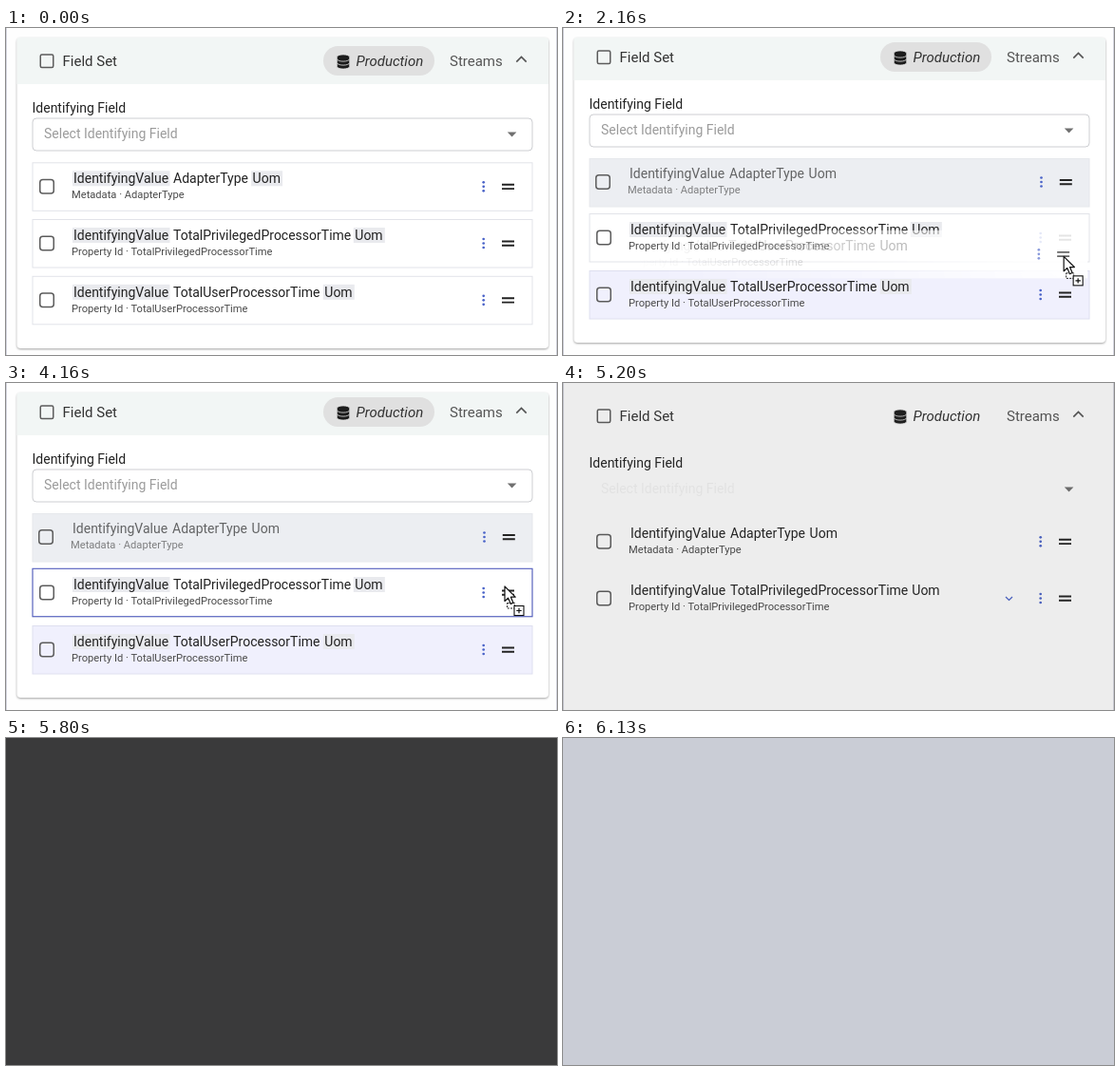
Recreate the animation shown at these times as an HTML page. Size 580x344 px, loop 6.16 s.

```html
<!DOCTYPE html>
<html lang="en">
<head>
<meta charset="utf-8">
<title>Field set</title>
<style>
html, body { margin: 0; width: 100%; height: 100%; overflow: hidden; background: #fdfdfd; }
svg { display: block; width: 580px; height: 344px; font-family: Roboto, "Open Sans", sans-serif; }
.flat .surf { display: none; }
.flat .hint { opacity: .12; }
.title { font-size: 14px; fill: #222; }
.sub { font-size: 11.15px; fill: #4a4a4a; }
.head { font-size: 15px; fill: #333; }
.mark { fill: #e9eaee; }
.line { fill: none; stroke-linecap: butt; }
</style>
</head>
<body>
<svg id="stage" viewBox="0 0 580 344"></svg>
<script>
(() => {
const LOOP = 6160;
const stage = document.getElementById('stage');

function el(parent, tag, attrs = {}, content) {
  const node = document.createElementNS(stage.namespaceURI, tag);
  set(node, attrs);
  if (content) node.textContent = content;
  parent.appendChild(node);
  return node;
}
function set(node, attrs) {
  for (const key in attrs) node.setAttribute(key, attrs[key]);
}
const rect = (p, x, y, width, height, attrs) => el(p, 'rect', { x, y, width, height, ...attrs });
const path = (p, d, attrs) => el(p, 'path', { d, ...attrs });
const text = (p, x, y, cls, str, attrs) => el(p, 'text', { x, y, class: cls, ...attrs }, str);
const move = (node, x, y) => node.setAttribute('transform', `translate(${x} ${y})`);
const show = (node, on) => node.setAttribute('visibility', on ? 'visible' : 'hidden');
const clamp = v => Math.max(0, Math.min(1, v));
const span = (t, a, b) => clamp((t - a) / (b - a));
const ease = v => v * v * (3 - 2 * v);
const lerp = (a, b, v) => a + (b - a) * v;
const mix = (a, b, v) => `rgb(${a.map((c, i) => Math.round(lerp(c, b[i], v)))})`;

function checkbox(p, x, y, size, r) {
  return rect(p, x - size / 2, y - size / 2, size, size,
    { rx: r, fill: 'none', stroke: '#5c5c5c', 'stroke-width': 1.5 });
}

// One draggable row, drawn from its own top edge
function makeRow(p, label, sub, uomX) {
  const g = el(p, 'g');
  const box = rect(g, 28, .5, 526, 50.5, { class: 'surf', fill: '#fff', stroke: '#e2e3e9' });
  const left = el(g, 'g');
  checkbox(left, 43, 25.5, 14.5, 3);
  const marks = el(left, 'g', { class: 'surf' });
  rect(marks, 70, 9, 102.5, 16, { class: 'mark' });
  rect(marks, uomX - 1.5, 9, 33, 16, { class: 'mark' });
  const words = el(left, 'g');
  text(words, 71, 22, 'title', 'IdentifyingValue');
  text(words, 176, 22, 'title', label);
  text(words, uomX, 22, 'title', 'Uom');
  text(words, 69, 38, 'sub', sub);
  const right = el(g, 'g');
  for (const y of [21, 25.5, 30])
    el(right, 'circle', { cx: 502.7, cy: y, r: 1.35, fill: '#4a63c8' });
  const grip = path(right, 'M522 23.5H535M522 27.8H535', { stroke: '#222', 'stroke-width': 1.9 });
  return { g, box, left, marks, words, right, grip };
}

// Page and card
rect(stage, 0, 0, 580, 344, { fill: '#fefefe' });
path(stage, 'M.5 0V344M579.5 0V344', { stroke: '#d3d4de' });
const surf = el(stage, 'g', { class: 'surf' });
const card = rect(surf, 11.5, 10, 559.5, 327, {
  rx: 4, fill: '#fff', style: 'filter:drop-shadow(0 1px 1.3px rgba(0,0,0,.36))'
});
const band = path(surf, '', { fill: '#f2f6f5' });

const header = el(stage, 'g');
checkbox(header, 43, 34.8, 13.5, 1.5);
text(header, 59.5, 40, 'head', 'Field Set');
rect(header, 334, 19, 117, 31, { rx: 15.5, fill: '#e0e0e0', class: 'surf' });
for (const y of [38.5, 34.5, 30.5]) {
  path(header, `M348.3 ${y}a6.7 2.6 0 0 1 13.4 0v2a6.7 2.6 0 0 1-13.4 0z`,
    { fill: '#1c1c1c', stroke: '#e4e4e4', 'stroke-width': .8 });
}
text(header, 368.5, 40, 'head', 'Production', { 'font-style': 'italic' });
text(header, 467, 40, 'head', 'Streams', { style: 'fill:#555' });
path(header, 'M537.3 35.6L542.5 30.4L547.7 35.6', { class: 'line', stroke: '#555', 'stroke-width': 1.6 });
text(header, 27.5, 88.5, 'title', 'Identifying Field');
rect(header, 28, 95, 526, 34, { rx: 4, fill: '#fff', stroke: '#cdced2', class: 'surf' });
text(header, 40, 116.3, 'title hint', 'Select Identifying Field', { style: 'fill:#9b9b9b' });
path(header, 'M527.8 109.5H537.4L532.6 114.4Z', { fill: '#707070' });

// Rows
const procTime = 'TotalUserProcessorTime';
const privTime = 'TotalPrivilegedProcessorTime';
const rows = [
  makeRow(stage, 'AdapterType', 'Metadata · AdapterType', 259.6),
  makeRow(stage, privTime, 'Property Id · ' + privTime, 367.3),
  makeRow(stage, procTime, 'Property Id · ' + procTime, 335.3)
];
const restTops = [141.3, 201, 260.8];
const dragTops = [137, 195, 255];
const expand = path(rows[1].right, 'M466 24L469.5 27.4L473 24',
  { class: 'line', stroke: '#4a63c8', 'stroke-width': 1.3 });

// Drag image: a row copy that fades away from the pointer
const defs = el(stage, 'defs');
const fadeGrad = el(defs, 'radialGradient',
  { id: 'fade', gradientUnits: 'userSpaceOnUse', cx: 529, cy: 28, r: 450 });
for (const [offset, level] of [[0, .93], [.4, .5], [.8, .16], [1, 0]])
  el(fadeGrad, 'stop', { offset, 'stop-color': '#fff', 'stop-opacity': level });
const mask = el(defs, 'mask',
  { id: 'soft', maskUnits: 'userSpaceOnUse', x: 20, y: 0, width: 540, height: 52 });
rect(mask, 20, 0, 540, 52, { fill: 'url(#fade)' });
const ghost = el(stage, 'g');
const ghostRow = makeRow(el(ghost, 'g', { mask: 'url(#soft)' }), procTime, 'Property Id · ' + procTime, 335.3);
set(ghostRow.box, { stroke: 'none' });
set(ghostRow.words, { opacity: .6 });
set(ghostRow.right, { opacity: .75 });
ghostRow.marks.remove();
const outline = rect(stage, 28, 195.3, 526, 50.4, { fill: 'none', stroke: '#5560c0', 'stroke-width': 1.1 });

// Pointers
const ink = { fill: '#fff', stroke: '#111', 'stroke-width': 1.2, 'stroke-linejoin': 'round' };
const hand = el(stage, 'g');
path(hand, 'M-2 10L-4 6C-5 4-8 1-7.8 0C-7.4-1.4-5.4-.8-4 1L-5-4.5C-5.2-6.4-3-6.7-2.5-5L-1.5-1L-1.7-6.4' +
  'C-1.7-8.2.6-8.2.8-6.4L1.2-1.2L2-6C2.3-7.6 4.4-7.3 4.2-5.5L3.9-.7L5.4-3.6C6.2-5 8-4.2 7.5-2.6' +
  'L6 3C5.7 5 5.5 6 5 7L4.8 10Z', ink);
const arrow = el(stage, 'g');
const badge = el(arrow, 'g');
rect(badge, 2.5, 17.5, 8, 5.5, { fill: 'none', stroke: '#222', 'stroke-dasharray': '2 1.2' });
rect(badge, 10, 20.5, 10, 10, { fill: '#fff', stroke: '#111', 'stroke-width': 1.1 });
path(badge, 'M12.3 25.5H17.7M15 22.8V28.2', { stroke: '#111', 'stroke-width': 1.2 });
path(arrow, 'M0 0V15.5L3.6 12.2L6.3 18.4L9 17.2L6.4 11.2H11.2Z', ink);

const shade = rect(stage, 0, 0, 580, 344, { fill: '#3a3a3b' });

function pointer(t) {
  if (t < 1660) {
    const v = 1 - (1 - span(t, 830, 1330)) ** 2;
    return [lerp(544, 528, v), lerp(346, 288, v)];
  }
  const a = ease(span(t, 1660, 2260));
  const b = ease(span(t, 2300, 2900));
  const c = span(t, 3260, 3460);
  return [529 - 2 * a - 4 * b + 2 * c, 283 - 46 * a - 26 * b + 3 * c];
}

function layout(t) {
  const drag = t >= 1690 && t < 4200;
  const done = t >= 4200;
  const gone = ease(span(t, 4200, 4530));
  const [x, y] = pointer(t);
  const lift = drag ? 4 : 0;
  const hover = t >= 830 && (drag || y < 312) && !done;

  move(header, 0, -lift);
  set(card, { height: drag ? 321 : lerp(327, 267, gone) });
  set(band, { d: `M11.5 ${59 - lift}V14a4 4 0 0 1 4-4H567a4 4 0 0 1 4 4V${59 - lift}Z` });
  rows.forEach((row, i) => move(row.g, 0, (drag ? dragTops : restTops)[i]));

  const [first, , third] = rows;
  set(first.box, { fill: drag ? '#eceef2' : '#fff', stroke: drag ? '#e6e8ec' : '#e2e3e9' });
  show(first.marks, !drag);
  set(first.words, { opacity: drag ? .68 : 1 });
  move(first.left, drag ? -1 : 0, drag ? -.6 : 0);
  move(first.right, drag ? .8 : 0, drag ? -.5 : 0);
  set(third.box, { fill: hover ? '#f0f0fd' : '#fff', stroke: hover ? '#dedff0' : '#e2e3e9' });
  set(third.g, { opacity: 1 - gone });
  show(expand, done);

  const holding = t >= 830 && !drag && !done && y < 297;
  show(hand, holding);
  show(third.grip, !holding);
  move(hand, x, y);
  const pointing = t >= 830 && !holding && !done;
  show(arrow, pointing);
  show(badge, pointing && drag);
  move(arrow, x, y);

  show(outline, drag && t >= 2300);
  show(ghost, drag && t < 3460);
  set(ghost, { opacity: 1 - span(t, 3260, 3460) });
  move(ghost, x - 529, y - 28);
}

function draw(t) {
  layout(t);
  stage.setAttribute('class', t >= 5200 ? 'flat' : '');
  const dark = [58, 58, 59];
  let cover = 0, tone = 0;
  if (t >= 5200) cover = Math.min(1, .086 + .914 * Math.floor((t - 5200) / 40) / 15);
  if (t >= 5860) tone = Math.min(5, Math.floor((t - 5860) / 67.5) + 1) / 5;
  set(shade, { opacity: cover, fill: mix(dark, [202, 205, 214], tone) });
}

const start = performance.now();
function tick() {
  draw((performance.now() - start) % LOOP);
  requestAnimationFrame(tick);
}
tick();
})();
</script>
</body>
</html>
```
